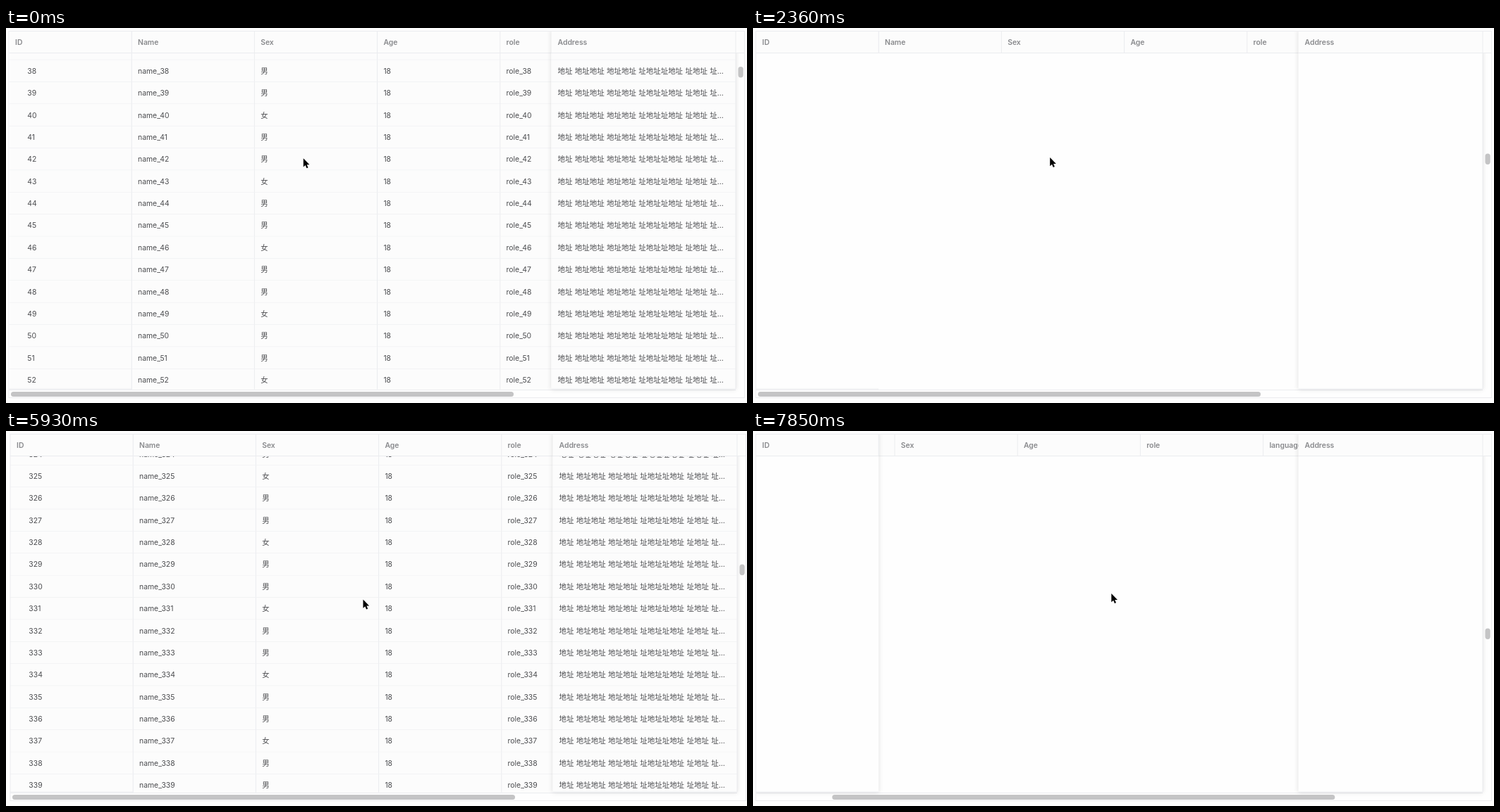
These frames come from a looping animation (1051x533 px, 8 s). An HTML page:

```html
<!DOCTYPE html>
<html lang="zh-CN">
<head>
<meta charset="utf-8">
<title>Virtual table</title>
<style>
  html, body { margin: 0; width: 100%; height: 100%; overflow: hidden; background: #fdfdfd; }
  svg { display: block; width: 100%; height: 100%; }
  text {
    font: 10.4px Inter, "Noto Sans CJK SC", "Noto Sans CJK", sans-serif;
    fill: #4c4d50;
  }
  .head text { font-weight: 600; fill: #898a8d; }
  .addr { font-size: 10.46px; word-spacing: .5px; }
  .line { stroke: #ebecef; stroke-width: 1; fill: none; }
  .cell { fill: #fcfcfc; }
  .blank { fill: #fefefe; }
  .thumb { fill: #c4c4c5; }
  .shadow { fill: #000; fill-opacity: .13; filter: url(#blur); }
</style>
</head>
<body>
<svg viewBox="0 0 1051 533" preserveAspectRatio="none">
  <defs>
    <filter id="blur" x="-10%" y="-10%" width="120%" height="120%"><feGaussianBlur stdDeviation="3"/></filter>
    <clipPath id="frame"><rect x="4" y="4" width="1043.5" height="521.5"/></clipPath>
    <clipPath id="body"><rect x="4" y="36" width="1031" height="477.5"/></clipPath>
  </defs>
  <g id="table"></g>
  <g id="cursor">
    <path d="M.6 1V13L3.3 10.6 5.2 14.8 7.3 13.9 5.5 9.8H9.2Z" fill="#000" opacity=".16"/>
    <path d="M0 0V12.3L2.8 9.8 4.6 14 6.7 13.1 4.9 9H8.7Z" stroke="#fff" stroke-width="1.8" stroke-linejoin="round" paint-order="stroke"/>
  </g>
</svg>
<script>
const LOOP = 8000;
const ROW = 31.37, COL = 174.2, LEFT = 4, TOP = 36, BOTTOM = 513.5;
const ID_END = LEFT + COL, FIX = 773.5, END = 1035, RIGHT = 1047.5;
const FIRST_ID = 38, FIRST_Y = 61, OVERSCAN = 7;
const H_RATIO = 1.438, V_RATIO = 66.9;
const ADDRESS = '地址 地址地址 地址地址 址地址址地址 址地址 址…';

const columns = [
  ['Name', id => 'name_' + id],
  ['Sex', id => id % 3 === 1 ? '女' : '男'],
  ['Age', () => 18],
  ['role', id => 'role_' + id],
  ['language', id => id % 2 ? 'zh_CN' : 'en_US'],
  ['rate', () => 5]
];

// Stepped tracks: [time, values...]
const scrollTrack = [
  [0, 0], [150, 250], [290, 1450], [440, 1600],
  [730, 1850], [880, 3000], [1030, 3560], [1170, 3645],
  [1470, 3844.6], [1620, 5100], [1760, 5900], [1910, 6050],
  [2210, 6300], [2360, 8262], [2510, 8650], [2650, 8900], [2800, 8980], [2950, 9000],
  [6960, 9252], [7110, 11000], [7260, 12300], [7410, 12450],
  [7710, 12700], [7850, 15086]
];
// Horizontal thumb offset, elastic shift of the whole table
const slideTrack = [
  [0, 0, 0], [3400, 90, 0], [3550, 188, 0],
  [4150, 194, 0], [4300, 203, 0], [4450, 219, 0], [4600, 244, 0], [4750, 313, 0],
  [5340, 120, 0], [5490, 0, 0], [5930, 0, 2], [6080, 0, 0],
  [6230, 30, 0], [6370, 68, 0], [6520, 96, 0], [6670, 105.3, 0]
];
const cursorTrack = [
  [0, 421.8, 185.3], [880, 421.2, 184], [2800, 470, 215],
  [2950, 506.5, 239.5], [6960, 506.5, 238.5], [7710, 508.3, 231]
];

const table = document.getElementById('table');
const cursor = document.getElementById('cursor');

const stepAt = (track, t) => track.findLastIndex(step => step[0] <= t);
const n = v => +v.toFixed(2);
const rect = (cls, x, y, w, h, r = 0) =>
  `<rect class="${cls}" x="${n(x)}" y="${n(y)}" width="${n(w)}" height="${n(h)}" rx="${r}"/>`;
const line = (x1, y1, x2, y2) => `<path class="line" d="M${n(x1)} ${n(y1)}L${n(x2)} ${n(y2)}"/>`;
const text = (x, mid, s, cls = '') => `<text class="${cls}" x="${n(x)}" y="${n(mid + 3.8)}">${s}</text>`;
const colX = (i, slide) => LEFT + COL * (i + 1) - slide;

const rowAt = (y, scroll) => Math.floor((y - FIRST_Y + ROW / 2 + scroll) / ROW) + FIRST_ID;

// Rows lag one step behind the scroll position, so fast scrolling shows blanks
function visibleRows(scroll, before) {
  const from = Math.max(rowAt(TOP, scroll), rowAt(TOP, before) - OVERSCAN);
  const to = Math.min(rowAt(514, scroll), rowAt(514, before) + OVERSCAN);
  const rows = [];
  for (let id = from; id <= to; id++) {
    rows.push({ id, mid: FIRST_Y + (id - FIRST_ID) * ROW - scroll });
  }
  return rows;
}

function pane(x, w, rows, content) {
  const cells = rows.map(({ id, mid }) =>
    rect('cell', x, mid - ROW / 2, w, ROW + .1) +
    line(x, mid + ROW / 2, x + w, mid + ROW / 2) + content(id, mid)).join('');
  return `<g clip-path="url(#body)">${cells}</g>`;
}

function fixedPane(x, w, title, rows, content, shadow) {
  return (shadow ? `<g clip-path="url(#frame)">${rect('shadow', x, 4, w, 509.5)}</g>` : '') +
    rect('blank', x, TOP, w, BOTTOM - TOP) +
    pane(x, w, rows, content) +
    `<g class="head">${rect('cell', x, 4.5, w, 31)}${text(x + 9, 20, title)}</g>` +
    line(x, 35.5, x + w, 35.5) + line(x, 513, x + w, 513);
}

function drawTable(scroll, before, thumb) {
  const slide = thumb * H_RATIO;
  const rows = visibleRows(scroll, before);
  let out = rect('cell', LEFT, 4, RIGHT - LEFT, 521.5) +
    rect('blank', LEFT, TOP, RIGHT - LEFT, 489);

  out += pane(LEFT, END - LEFT, rows, (id, mid) => columns.map(([, value], i) => {
    const x = colX(i, slide);
    return line(x, mid - ROW / 2, x, mid + ROW / 2) + text(x + 8.8, mid, value(id));
  }).join(''));

  out += '<g class="head" clip-path="url(#frame)">' + columns.map(([title], i) => {
    const x = colX(i, slide);
    return line(x, 4, x, 35.5) + text(x + 8.8, 20, title);
  }).join('') + '</g>';
  out += line(LEFT, 35.5, RIGHT, 35.5) + line(LEFT, 514.5, END, 514.5);

  out += fixedPane(LEFT, COL, 'ID', rows, (id, mid) =>
    text(30.3, mid, id) + line(ID_END, mid - ROW / 2, ID_END, mid + ROW / 2), thumb > 0);
  out += line(ID_END, 4, ID_END, 35.5);

  out += fixedPane(FIX, END - FIX, 'Address', rows, (id, mid) => text(FIX + 9, mid, ADDRESS, 'addr'), true);
  out += rect('cell', END, 4.5, RIGHT - END, 30.5) +
    line(END, 4, END, 513) + line(END, 35.5, RIGHT, 35.5);

  out += `<rect class="line" x="4" y="4.5" width="${RIGHT - LEFT}" height="521"/>`;
  out += rect('thumb', 7 + thumb, 517, 713, 7, 3.5);
  out += rect('thumb', 1038.5, 55 + scroll / V_RATIO, 7.2, 15.4, 3.6);
  table.innerHTML = out;
}

let shown = '';
function update(t) {
  const si = stepAt(scrollTrack, t), hi = stepAt(slideTrack, t), ci = stepAt(cursorTrack, t);
  const key = [si, hi, ci].join();
  if (key === shown) return;
  shown = key;
  const [, thumb, shift] = slideTrack[hi];
  const [, x, y] = cursorTrack[ci];
  drawTable(scrollTrack[si][1], scrollTrack[Math.max(0, si - 1)][1], thumb);
  table.setAttribute('transform', `translate(${shift} 0)`);
  cursor.setAttribute('transform', `translate(${x} ${y})`);
}

const start = performance.now();
function tick() {
  update((performance.now() - start) % LOOP);
  requestAnimationFrame(tick);
}
tick();
</script>
</body>
</html>
```
